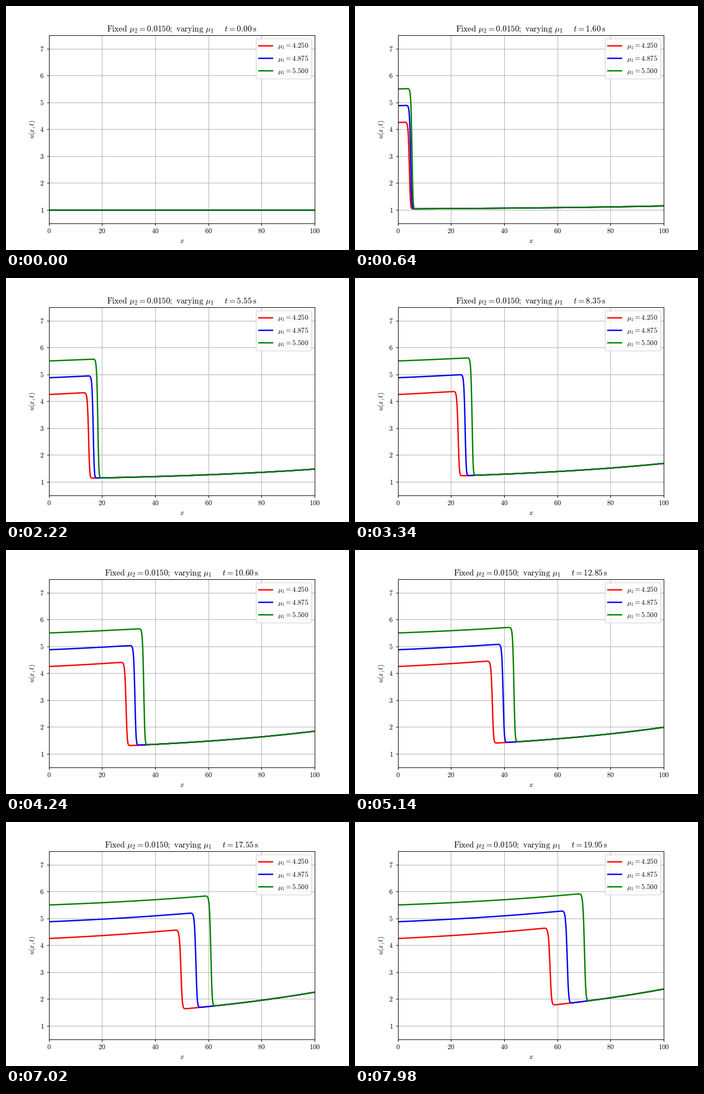
Animation of 630 by 450 pixels, one loop 8000 ms. Source, as a matplotlib script:

```python
import math

import numpy as np
import matplotlib.pyplot as plt
from matplotlib.animation import FuncAnimation
from matplotlib.ticker import FuncFormatter, MultipleLocator

plt.rcParams["mathtext.fontset"] = "cm"

# Burgers' equation u_t + (u^2/2)_x = 0.02 exp(MU2 x), with u(0, t) = mu1
MU2 = 0.015
CASES = [(4.25, "red"), (4.875, "blue"), (5.5, "green")]
CELLS, DT, FRAMES = 511, 0.05, 400
THETA = 0.7  # implicit weight in time

x = np.linspace(0, 100, CELLS + 1)
dx = x[1] - x[0]
source = 0.02 * np.exp(MU2 * (x - dx / 2))


def solve(mu1):
    """March the upwind theta scheme; one row per time step."""
    u = np.ones(CELLS + 1)
    rows = [u]
    r = DT / dx
    c = THETA * r
    for _ in range(FRAMES - 1):
        flux = u**2 / 2
        rhs = u + DT * source
        rhs[1:] -= (1 - THETA) * r * (flux[1:] - flux[:-1])
        left = mu1
        new = [left]
        for b in rhs[1:].tolist():
            # positive root of c/2 v^2 + v = b + c/2 left^2
            left = (math.sqrt(1 + 2 * c * (b + c * left * left / 2)) - 1) / c
            new.append(left)
        u = np.array(new)
        rows.append(u)
    return rows


def title_text(t):
    return (r"$\mathrm{Fixed}\hspace{0.38}\mu_2=0.0150\mathrm{;}\hspace{0.38}"
            r"\mathrm{varying}\hspace{0.38}\mu_1\hspace{1.5}"
            rf"t={t:.2f}\hspace{{0.19}}\mathrm{{s}}$")


fig, ax = plt.subplots(figsize=(7, 5), dpi=90)
ax.set(xlim=(0, 100), ylim=(0.5, 7.5))
ax.set_xlabel("$x$")
ax.set_ylabel("$u(x,t)$")
ax.grid(True)
for axis, step in ((ax.xaxis, 20), (ax.yaxis, 1)):
    axis.set_major_locator(MultipleLocator(step))
    axis.set_major_formatter(FuncFormatter(lambda v, _: f"${v:g}$"))

runs = [solve(mu1) for mu1, _ in CASES]
lines = [ax.plot(x, run[0], color=color, lw=2, label=rf"$\mu_1={mu1:.3f}$")[0]
         for run, (mu1, color) in zip(runs, CASES)]
ax.legend(loc="upper right")
title = ax.set_title(title_text(0))


def update(k):
    for line, run in zip(lines, runs):
        line.set_ydata(run[k])
    title.set_text(title_text(k * DT))
    return [*lines, title]


anim = FuncAnimation(fig, update, frames=FRAMES, interval=20, repeat=True,
                     repeat_delay=0, blit=False)
plt.show()
```
